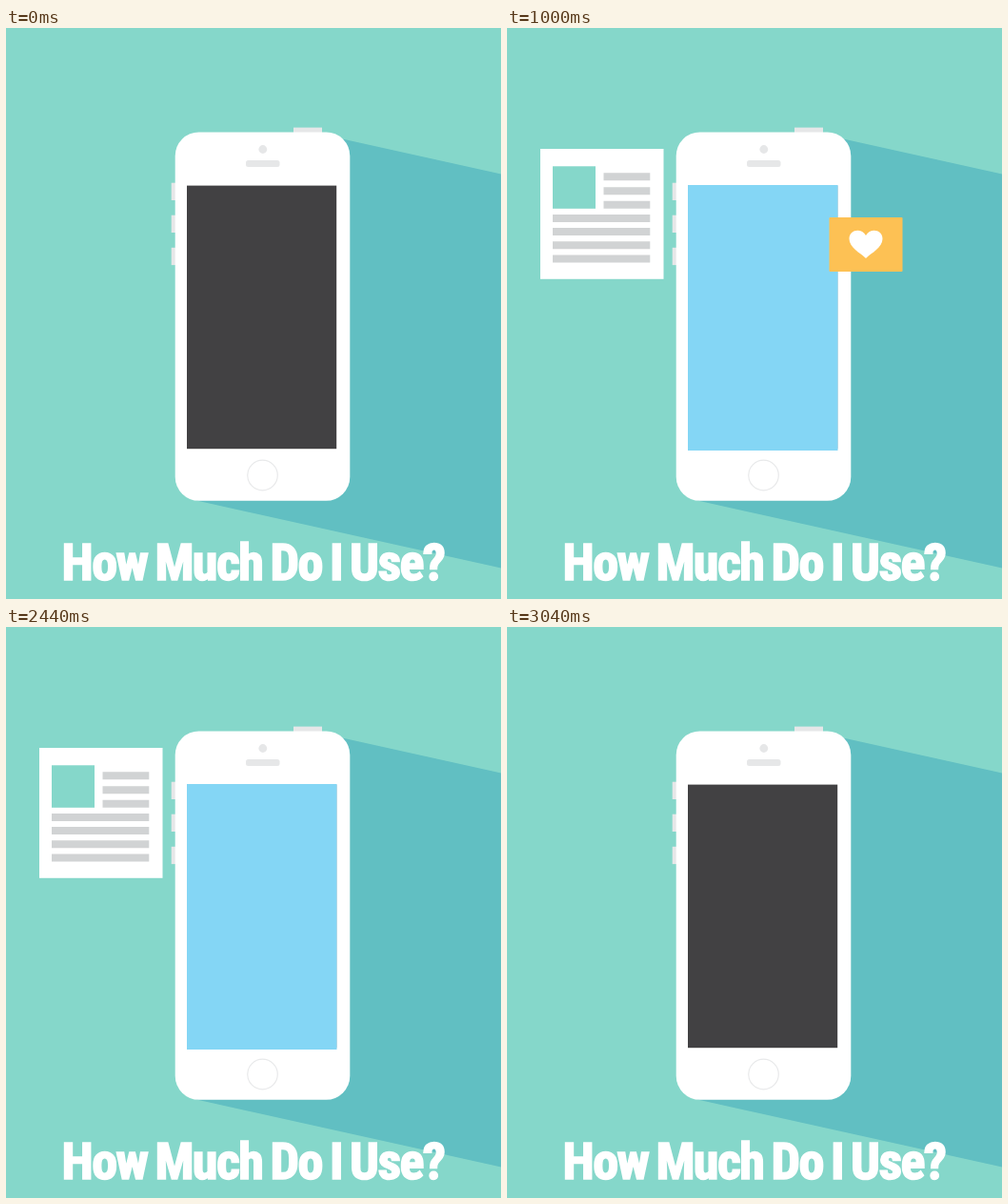
Write an HTML page that moves like this. It is 520 by 600 pixels and loops after 3.4 s.

```html
<!DOCTYPE html>
<html lang="en">
<head>
<meta charset="utf-8">
<title>How Much Do I Use?</title>
<style>
  html, body { margin: 0; width: 100%; height: 100%; overflow: hidden; background: #85d7ca; }
  svg { display: block; width: 520px; height: 600px; }
  text { text-anchor: middle; }
  #title {
    font: 900 56px Impact, "Roboto Condensed", Roboto, "Open Sans", sans-serif;
    font-stretch: 75%;
    letter-spacing: -.03em; word-spacing: -.05em;
    fill: #fff; stroke: #fff; stroke-width: 1.6;
  }
  .day { font: bold 78px "Liberation Sans", Arial, sans-serif; }
  .month { font: 14.6px "Open Sans", "Noto Sans", sans-serif; }
</style>
</head>
<body>
<svg viewBox="0 0 520 600">
  <rect width="520" height="600" fill="#85d7ca"/>
  <path d="M352 116.3L520 153.5V567.5L200 496.5Z" fill="#61bfc2"/>

  <g fill="#e6e7e8">
    <rect x="302" y="104.6" width="30" height="8"/>
    <rect x="173.7" y="162.7" width="8" height="18.3"/>
    <rect x="173.7" y="196.7" width="8" height="18.3"/>
    <rect x="173.7" y="230.8" width="8" height="18.3"/>
  </g>
  <rect x="177.7" y="109.4" width="183.6" height="387.4" rx="25" fill="#fff"/>
  <g fill="#e6e7e8">
    <circle cx="269.8" cy="127.5" r="4.4"/>
    <rect x="252" y="139" width="35.5" height="7" rx="2.5"/>
  </g>
  <circle cx="269.5" cy="470" r="15.8" fill="none" stroke="#e8e9ea" stroke-width="1.2"/>
  <rect x="190" y="165.6" width="157.2" height="276.6" fill="#424143"/>
  <rect id="lit" x="190" y="165" width="157.5" height="279" fill="#84d6f5"/>

  <g id="news">
    <rect x="35" y="127" width="129.5" height="136.8" fill="#fff"/>
    <rect x="48" y="145.3" width="45" height="44.5" fill="#85d7ca"/>
    <path d="M101.5 156.2H150.3M101.5 171.2H150.3M101.5 185.7H150.3M48 200H150.3M48 214H150.3M48 228.3H150.3M48 242.5H150.3"
          stroke="#d1d3d4" stroke-width="8"/>
  </g>

  <g id="like">
    <rect x="338.5" y="199" width="77" height="57" rx="1" fill="#fdc154"/>
    <path d="M377 242C371 236 359.5 231 359.5 221.5C359.5 211.5 372.5 209.5 377 218C381.5 209.5 394.5 211.5 394.5 221.5C394.5 231 383 236 377 242Z" fill="#fff"/>
  </g>

  <g id="photo">
    <rect x="293.3" y="345.3" width="129.5" height="80.4" fill="#52a9e7"/>
    <path d="M354 398L377 375L400.3 398Z" fill="#7ad48e"/>
    <path d="M368 384L377 375L386.2 384L382 383L377.5 385.5L373 383Z" fill="#c6d8d2"/>
    <path d="M312 398L335.3 369L358.5 398Z" fill="#7ad48e"/>
    <path d="M328 378L335.3 369L342.8 378L339 377L335.5 379.5L332 377Z" fill="#c6d8d2"/>
    <path d="M353.5 397.5L358 391" stroke="#5fbd80" fill="none"/>
  </g>

  <g id="date">
    <rect x="102.7" y="300" width="125.8" height="125.6" rx="1" fill="#e6e7e9"/>
    <rect x="102.7" y="300" width="125.8" height="21" fill="#cf383f"/>
    <g fill="#231f20">
      <text class="day" x="165.7" y="388" stroke="#231f20" stroke-width=".8">2</text>
      <text class="month" x="165.7" y="405">March</text>
    </g>
  </g>

  <text id="title" x="259.5" y="579.5">How Much Do I Use?</text>
</svg>
<script>
const LOOP = 3400, STEP = 40;
const $ = id => document.getElementById(id);
const clamp = v => Math.max(0, Math.min(1, v));

// end and start centres, time of first sight, time of first retreat, visible steps
const cards = [
  { id: 'news', to: [99.7, 195.4], from: [173.5, 206.5], show: 640, hide: 2520, n: 4 },
  { id: 'like', to: [377, 227.5], from: [336, 232], show: 840, hide: 2360, n: 3 },
  { id: 'photo', to: [358, 385.5], from: [330, 378], show: 1040, hide: 2240, n: 2 },
  { id: 'date', to: [165.6, 362.8], from: [205, 356], show: 1200, hide: 2040, n: 4 }
];

function placeCard(c, t) {
  // step count: 0 is hidden, n is fully open
  const k = t < c.hide ? (t - c.show) / STEP + 1 : c.n - 1 - (t - c.hide) / STEP;
  const el = $(c.id);
  if (k <= 0) { el.setAttribute('opacity', 0); return; }
  const p = clamp((k - 1) / (c.n - 1));
  const u = p ** 1.3;
  const s = 0.43 + 0.57 * u;
  const [x, y] = c.to.map((v, i) => c.from[i] + (v - c.from[i]) * u);
  el.setAttribute('opacity', 0.38 + 0.62 * p);
  el.setAttribute('transform',
    `translate(${x} ${y}) scale(${s}) translate(${-c.to[0]} ${-c.to[1]})`);
}

function draw(now) {
  const t = Math.floor((now % LOOP) / STEP) * STEP;
  $('lit').setAttribute('opacity', Math.min(clamp(t / 280), clamp((3040 - t) / 280)));
  cards.forEach(c => placeCard(c, t));
}

// largest size up to 56px at which the line keeps its margins
function fitTitle() {
  const len = $('title').getComputedTextLength();
  $('title').style.fontSize = Math.min(56, 56 * 402 / len) + 'px';
}

fitTitle();
const start = performance.now();
(function tick() {
  draw(performance.now() - start);
  requestAnimationFrame(tick);
})();
</script>
</body>
</html>
```
